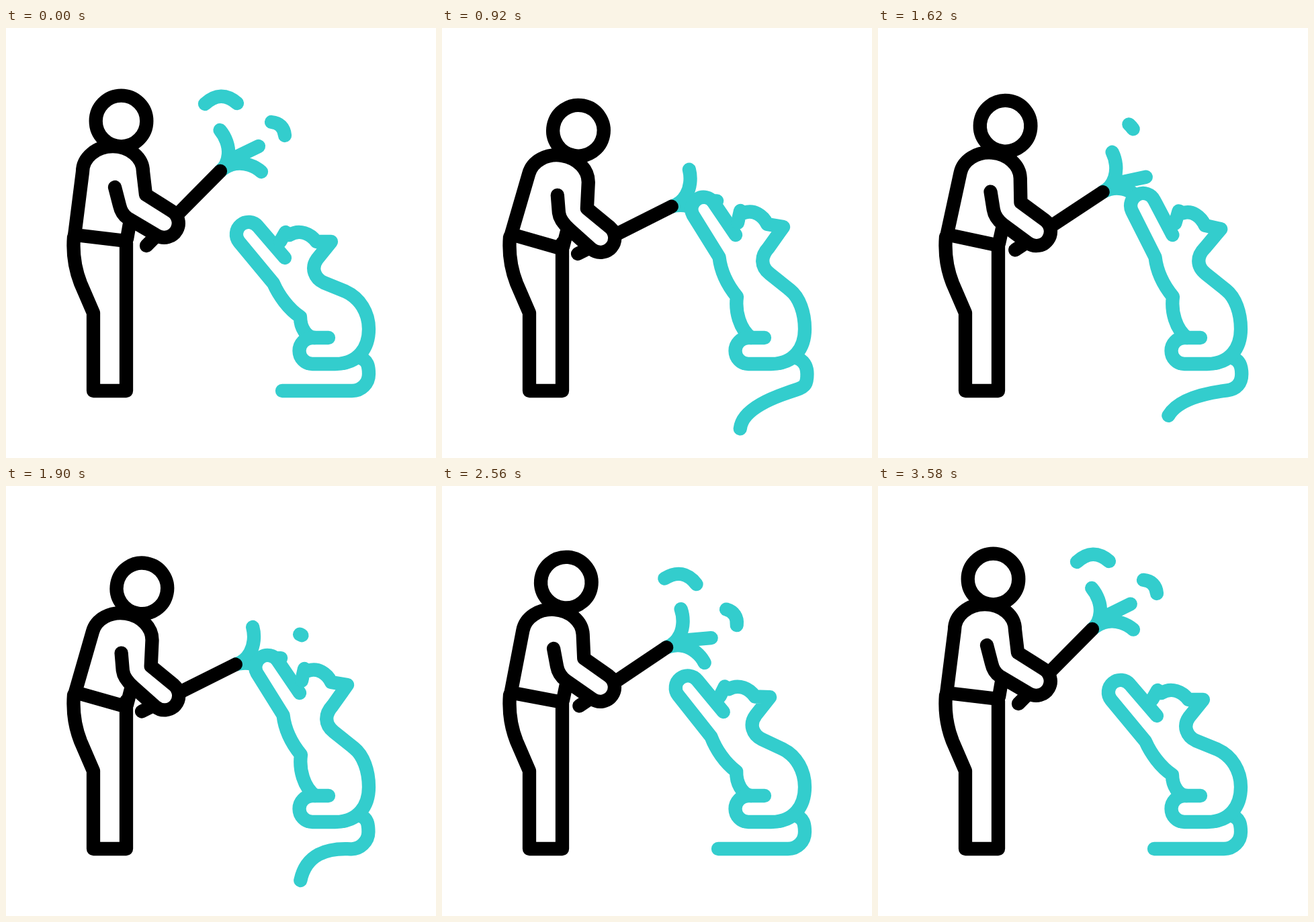
Write an HTML page that moves like this. It is 640 px wide and 640 px high and loops after 3.6 s.

```html
<!DOCTYPE html>
<html lang="en">
<head>
<meta charset="utf-8">
<title>Playing with the cat</title>
<style>
  html, body { margin: 0; width: 100%; height: 100%; overflow: hidden; background: #fff; }
  svg { display: block; width: 100%; height: 100%; }
  path, circle { fill: none; stroke-width: 20.3; stroke-linecap: round; stroke-linejoin: round; }
  .ink { stroke: #000; }
  .teal { stroke: #33cdcd; }
  .solid { fill: #fff; }
</style>
</head>
<body>
<svg viewBox="0 0 640 640">
  <g id="wand">
    <g class="teal">
      <path id="swishA" pathLength="100" d="M296 113Q320 91 344 112"/>
      <path id="swishB" pathLength="100" d="M395 140C407 141 414 148 415 160"/>
      <path id="feathers" d="M318.5 152C327 162 332 176 331 188C330 200 326 207 319 213
        M376 176L345 191Q332 198 319 213M380 214C370 205 355 200 342 202C333 203 325 208 319 213"/>
    </g>
    <path class="ink" d="M209 324L319 213"/>
  </g>
  <g class="teal">
    <path id="tail"/>
    <path id="arm" class="solid"/>
    <path id="body"/>
  </g>
  <g class="ink">
    <path id="torso" class="solid"/>
    <path d="M101 311C99 336 102 357 111 380L130 424V540H179V320"/>
    <circle id="head" cx="171.5" cy="138.5" r="37.8"/>
  </g>
</svg>
<script>
const LOOP = 3600;
const $ = id => document.getElementById(id);
const set = (id, name, value) => $(id).setAttribute(name, value);

// Key points as [time, value]; the value rests outside them.
const lean = [[0, 0], [860, 1], [1440, .41], [2020, 1.03], [3000, -.05], [LOOP, 0]];
const swing = [[0, 0], [520, 9.5], [940, 18.6], [1400, 8], [1960, 19], [2560, 11.4], [3000, -1.3], [LOOP, 0]];
const rise = [[0, 0], [500, 1], [1980, 1], [2770, 0]];
const bat = [[520, 0], [900, 1], [1300, 0], [1900, 1]];
const droop = [[0, 0], [520, .58], [780, 1], [1420, .28], [1810, .88], [2200, 0]];
const tilt = [[0, 0], [520, 1], [1300, 1.2], [1900, -.2], [2200, 0]];

// Resting and bowed person.
const torso = [
  'M102 309L114 214A45 38 0 0 1 204 214L208 248L246 272A21 21 0 0 1 225 309L181 283C175 279 171 273 169 264L162 237' +
  'M184 291L180 314M103 308L179 317',
  'M103 307L129.5 217A45 38 9 0 1 218 231L216 269L250 297A21 21 0 0 1 222 329L190 300C180 291 175 284 174 275L172 249' +
  'M186 303L180 326M103 307L179 329'
];

// Resting, reaching and batting cat.
const belly = 'L412.5 341C415 362 425 383 439 400C436 422 443 448 460 461';
const arms = [
  'M415 342L375 295.5A18 18 0 0 0 347 318.5L398 380C406 398 420 418 438 430C438 446 447 461 460 461',
  'M440 308L420 252.5A18.5 18.5 0 0 0 383.5 265' + belly,
  'M437 308L404 259.5A18 18 0 0 0 373.5 278.5' + belly
];
const haunch = '540 448C540 475 525 500 490 500H456A19.5 19.5 0 0 1 456 461H480';
const back = 'C474 340 474 355 488 366L518 390C532 401 540 424 ' + haunch;
const bodies = [
  'M408 318L416 304L422 308C437 299 453 306 462 318L484 318L463 344' +
  'C453 358 460 373 473 379L505 392C527 402 540 424 ' + haunch,
  'M445 292L452 273L458 276C473 272 484 283 490 296L513 303L487 328' + back,
  'M440 290L444 272L450 275C464 270 478 279 484 292L508 296L486 327' + back
];

// Blends the numbers of two paths that share one structure.
function mix(a, b, k) {
  const to = b.match(/-?[\d.]+/g);
  let i = 0;
  return a.replace(/-?[\d.]+/g, n => +(+n + (to[i++] - n) * k).toFixed(3));
}

// Smooth interpolation that never overshoots its keys.
function at(keys, t) {
  const last = keys.length - 1;
  if (t <= keys[0][0]) return keys[0][1];
  if (t >= keys[last][0]) return keys[last][1];
  const i = keys.findIndex(k => k[0] > t) - 1;
  const rate = j => (keys[j + 1][1] - keys[j][1]) / (keys[j + 1][0] - keys[j][0]);
  const slope = j => {
    if (j === 0 || j === last) return 0;
    const a = rate(j - 1), b = rate(j);
    return a * b > 0 ? 2 * a * b / (a + b) : 0;
  };
  const h = keys[i + 1][0] - keys[i][0], x = (t - keys[i][0]) / h, y = 1 - x;
  return y * y * (1 + 2 * x) * keys[i][1] + x * x * (3 - 2 * x) * keys[i + 1][1]
    + h * x * y * (y * slope(i) - x * slope(i + 1));
}

// A swish wipes away and redraws, twice per loop.
function swish(id, t) {
  const ramp = from => Math.min(1, Math.max(0, (t - from) / 280));
  const [start, end] = t < 940 ? [ramp(260), 1]
    : t < 1260 ? [0, ramp(940)]
    : t < 1870 ? [ramp(1260), 1]
    : [0, ramp(1870)];
  $(id).style.display = end > start ? '' : 'none';
  set(id, 'stroke-dasharray', `${(end - start) * 100} 300`);
  set(id, 'stroke-dashoffset', -start * 100);
}

function drawPerson(t) {
  const s = at(lean, t), angle = at(swing, t);
  // Feathers bend with the stick and trail behind its motion.
  const bend = .55 * angle + 1.5 * (at(swing, t - 130) - angle);
  set('torso', 'd', mix(torso[0], torso[1], s));
  set('head', 'transform', `rotate(${11.2 * s} 113.5 309)`);
  set('wand', 'transform', `translate(0 ${22 * s}) rotate(${angle} 235 298)`);
  set('feathers', 'transform', `rotate(${bend} 319 213)`);
  swish('swishA', t - 130);
  swish('swishB', t);
}

function drawCat(t) {
  const up = at(rise, t), hit = at(bat, t);
  const pose = p => mix(p[0], mix(p[1], p[2], hit), up);
  set('arm', 'd', pose(arms));
  set('body', 'd', pose(bodies));

  const d = at(droop, t), k = at(tilt, t);
  const right = 540 + 3 * k;
  const low = [515 + 11 * k, 540 - 1.5 * k];
  const next = [480 + 12 * k, 540 + 8 * k];
  const prev = low.map((v, i) => v + (v - next[i]) * .4);
  const tip = [411 + 36 * d, 540 + 62 * d];
  const pull = [tip[0] + 34 * (1 - d), 540 + 12 * k + 14 * d];
  set('tail', 'd', `M527 491C538 494 ${right} 503 ${right} 515C${right} 529 ${prev} ${low}C${next} ${pull} ${tip}`);
}

const t0 = performance.now();
function tick() {
  const t = (performance.now() - t0) % LOOP;
  drawPerson(t);
  drawCat(t);
  requestAnimationFrame(tick);
}
tick();
</script>
</body>
</html>
```
